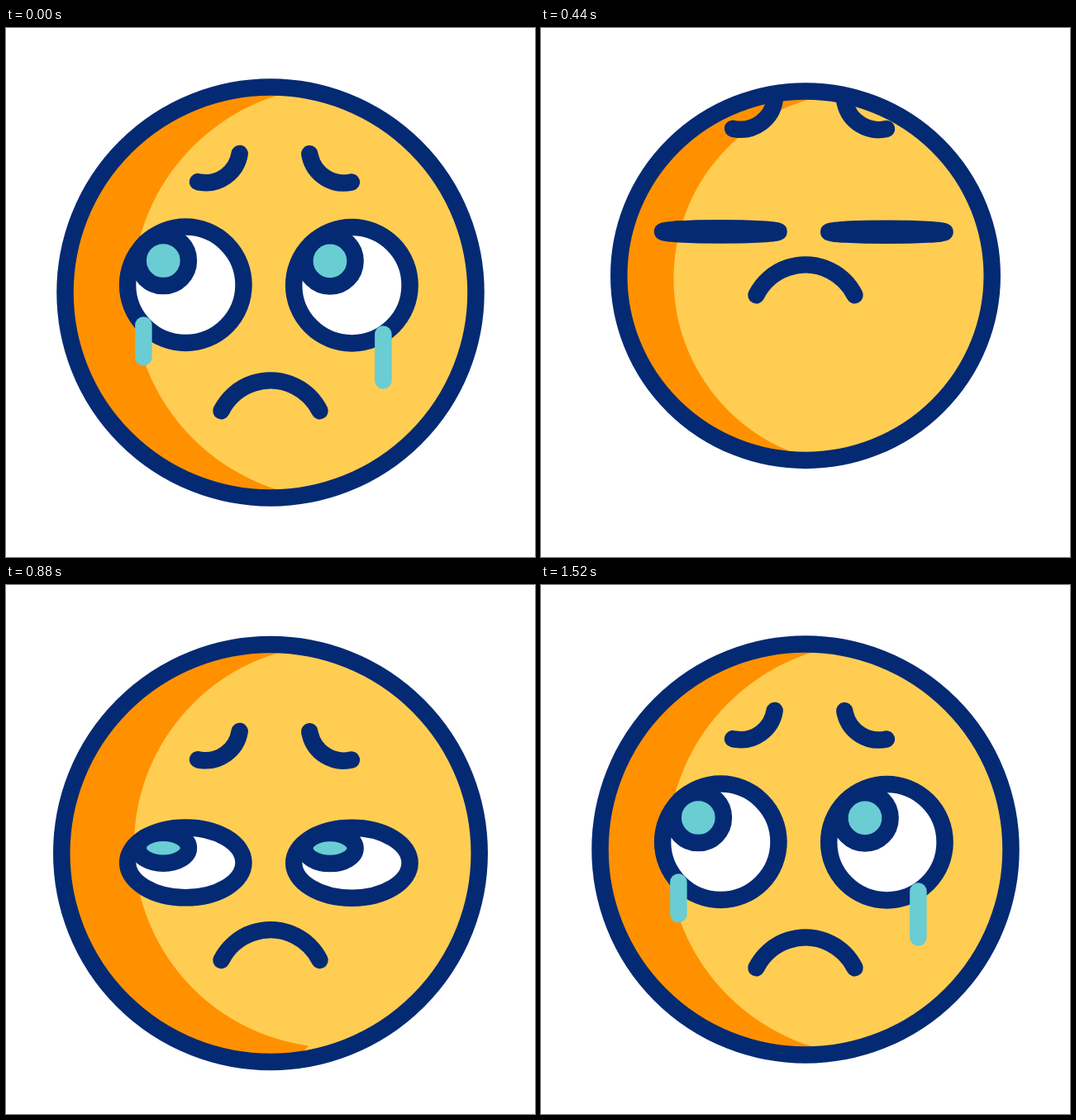
Recreate the animation shown at these times as an HTML page with a canvas. Size 640 by 640 pixels, loop 2 s.

```html
<!DOCTYPE html>
<html lang="en">
<head>
<meta charset="utf-8">
<title>Sad face</title>
<style>
  html, body { margin: 0; width: 100%; height: 100%; overflow: hidden; background: #fff; }
  canvas { display: block; width: 100vw; height: 100vh; object-fit: contain; }
</style>
</head>
<body>
<canvas id="stage" width="640" height="640"></canvas>
<script>
const ctx = document.getElementById('stage').getContext('2d');
const LOOP = 2000, STEP = 40, REST = 1520, LINE = 20.5;
const NAVY = '#042a74', ORANGE = '#ff9100', YELLOW = '#ffcd52', TEAL = '#69cdd3';

// Smooth 0..1 between two times; bias below 1 gives a quicker start.
function ease(t, from, to, bias = 1) {
  const x = Math.min(1, Math.max(0, (t - from) / (to - from)));
  return (1 - Math.cos(Math.PI * x ** bias)) / 2;
}

// Goes from 0 to a low point, to a peak, and back to 0.
function swing(t, low, lowTime, peak, peakTime, bias) {
  if (t < lowTime) return low * ease(t, 0, lowTime);
  if (t < peakTime) return low + (peak - low) * ease(t, lowTime, peakTime);
  return peak * (1 - ease(t, peakTime, REST, bias));
}

function ellipse(x, y, rx, ry) {
  ctx.beginPath();
  ctx.ellipse(x, y, rx, Math.max(ry, 0.05), 0, 0, Math.PI * 2);
}

function fill(color) {
  ctx.fillStyle = color;
  ctx.fill();
}

function stroke(color) {
  ctx.strokeStyle = color;
  ctx.stroke();
}

function drawArc(x, y, r, from, to) {
  ctx.beginPath();
  ctx.arc(x, y, r, from, to);
  stroke(NAVY);
}

function drawFace(t) {
  const face = low => swing(t, low, 605, 7.5, 948, 0.67);
  const outline = () => ellipse(320, 320 + face(-24.5), 248.5 + face(-27.5), 248.5 + face(-30.5));
  const shrink = -swing(t, -1, 570, 0, 1020, 1);

  outline();
  fill(ORANGE);
  ctx.save();
  ctx.clip();
  const r = 250 - 28 * shrink;
  ellipse(403 - 19.5 * shrink, 320 - 19 * shrink, r, r);
  fill(YELLOW);
  // The shade ends on a slanted edge at the chin.
  ctx.beginPath();
  ctx.moveTo(374, 550);
  ctx.lineTo(640, 284);
  ctx.lineTo(640, 640);
  ctx.lineTo(284, 640);
  fill(YELLOW);
  ctx.restore();
  return outline;
}

function drawEye(x, y, irisX, open) {
  ellipse(x, y, 70.2, 70.2 * open);
  fill('#fff');
  stroke(NAVY);
  ellipse(irisX, y - 29.3 * open, 30.6, 30.6 * open);
  fill(TEAL);
  stroke(NAVY);
}

function drawTear(x, top, length, start, end, dy) {
  if (end - start < 0.01) return;
  ctx.beginPath();
  ctx.moveTo(x, top + length * start + dy);
  ctx.lineTo(x, top + length * end + dy);
  stroke(TEAL);
}

function draw(t) {
  ctx.fillStyle = '#fff';
  ctx.fillRect(0, 0, 640, 640);
  ctx.lineWidth = LINE;
  ctx.lineCap = ctx.lineJoin = 'round';

  const outline = drawFace(t);
  const lift = swing(t, -71, 548, 33, 952, 0.54);
  const mouth = swing(t, -153, 542, 20, 1005, 0.73);
  const open = t < 520 ? 1 - ease(t, 0, 520) : ease(t, 520, 1155);

  drawArc(241.5, 145.5 + lift, 41.7, 0.155, 1.8);
  drawArc(408.5, 145.8 + lift, 41.7, Math.PI - 1.8, Math.PI - 0.155);
  outline();
  stroke(NAVY);

  drawEye(217.3, 310.8 + lift, 190.3, open);
  drawEye(418.4, 311.2 + lift, 392, open);

  const bend = Math.atan2(30, 59.5);
  drawArc(320, 493.2 + mouth, 66.7, Math.PI + bend, -bend);

  const falling = t < 520;
  const start = falling ? ease(t, 0, 421) : 0;
  const end = falling ? 1 : ease(t, 950, REST, 0.55);
  const dy = falling ? -3.3 * start : lift;
  drawTear(166.4, 359.5, 38.7, start, end, dy);
  drawTear(456.4, 370.5, 56, start, end, dy);
}

function tick() {
  const t = performance.now() % LOOP;
  draw(Math.floor(t / STEP) * STEP);
  requestAnimationFrame(tick);
}
tick();
</script>
</body>
</html>
```
